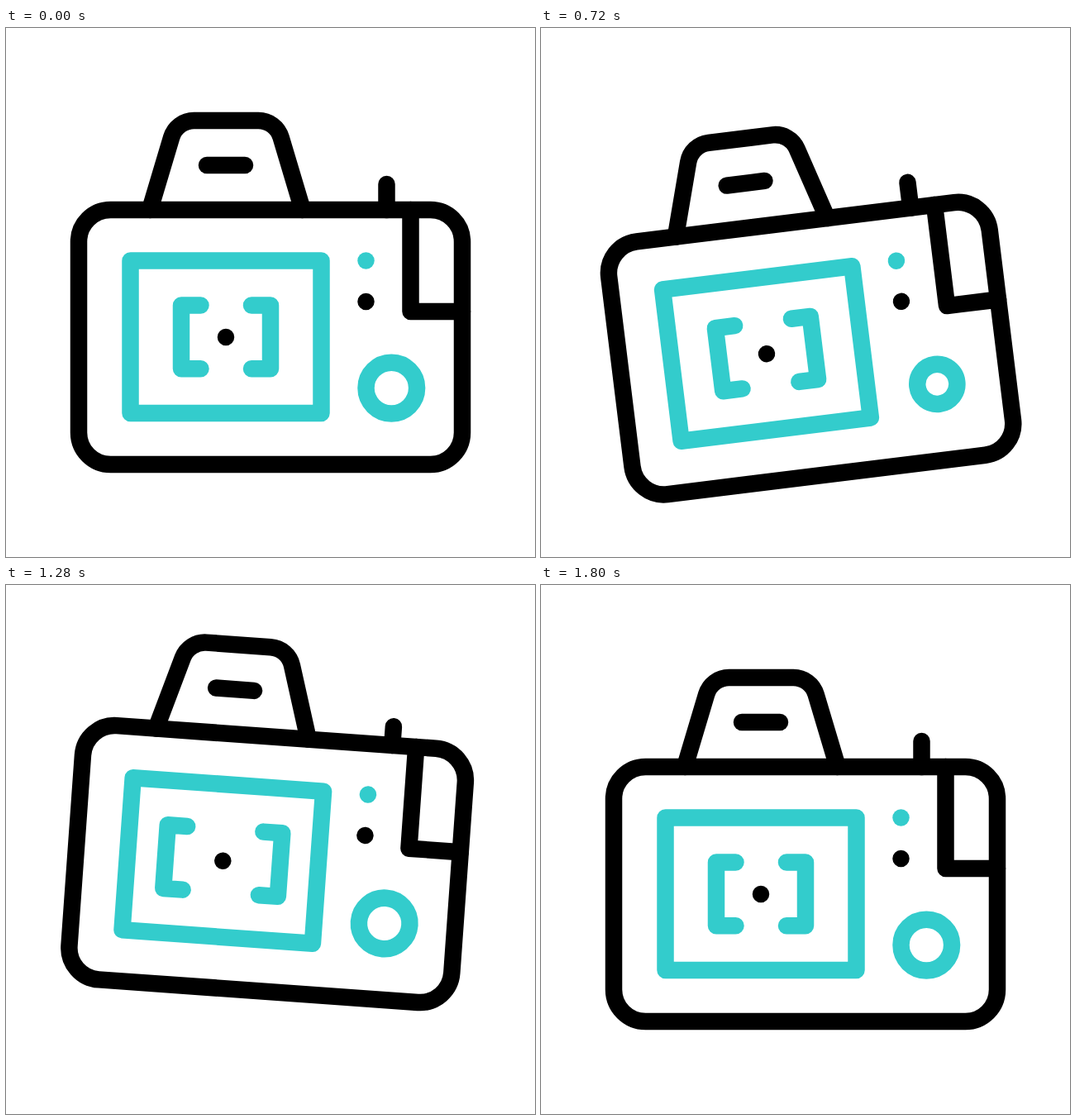
These frames come from a looping animation (640x640 px, 1920 ms). An HTML page:

```html
<!DOCTYPE html>
<html lang="en">
<head>
<meta charset="utf-8">
<title>Camera</title>
<style>
  html, body { margin: 0; width: 100%; height: 100%; overflow: hidden; background: #fff; }
  svg { display: block; width: 100%; height: 100%; }
  .line { fill: none; stroke: #000; stroke-width: 20.5; stroke-linecap: round; stroke-linejoin: round; }
  .teal { stroke: #3cc; }
</style>
</head>
<body>
<svg viewBox="0 0 640 640">
  <g id="camera" class="line">
    <path d="M174 220 200.2 132.3A28.5 28.5 0 0 1 227.5 112H305.3A28.5 28.5 0 0 1 332.6 132.3L358.8 220"/>
    <path d="M243 166H289"/>
    <path id="shutter"/>
    <rect x="88" y="220" width="464" height="308" rx="38.5"/>
    <path d="M489.5 220V343H552"/>
    <g class="teal">
      <rect x="150.5" y="281.5" width="231" height="184.6"/>
      <path id="left" d="M235.5 335.5H212V412.3H235.5"/>
      <path id="right" d="M297 335.5H320V412.3H297"/>
      <circle id="dial" cx="466.3" cy="435.6"/>
      <path d="M435.5 281.5h0"/>
    </g>
    <path d="M435.5 331h0M266 374h0"/>
  </g>
</svg>
<script>
  const LOOP = 1920, STEP = 40;
  const part = id => document.getElementById(id);
  const set = (id, name, value) => part(id).setAttribute(name, value);

  // Eased value through [time, value] keys, held before the first and after the last.
  function track(t, ...keys) {
    let [t0, v0] = keys[0];
    for (const [t1, v1] of keys) {
      if (t < t1) {
        const u = Math.max(0, (t - t0) / (t1 - t0 || 1));
        return v0 + (v1 - v0) * u * u * (3 - 2 * u);
      }
      [t0, v0] = [t1, v1];
    }
    return v0;
  }

  function draw() {
    const t = Math.floor((performance.now() % LOOP) / STEP) * STEP;
    const lift = track(t, [110, 0], [690, 14], [745, 14], [1160, -40], [1800, 0]);
    const tilt = track(t, [145, 0], [780, -7.2], [1175, 4.1], [1265, 4.1], [1800, 0]);
    const spread = track(t, [640, 0], [1008, 32], [1540, 0]);
    const shrink = track(t, [400, 0], [805, 7.6], [1147, 0]);
    const press = track(t, [880, 0], [1240, 8.5], [1580, 0]);

    set('camera', 'transform', `translate(0 ${lift}) rotate(${tilt} 320 320)`);
    set('left', 'transform', `translate(${-spread})`);
    set('right', 'transform', `translate(${spread})`);
    set('dial', 'r', 30.8 - shrink);
    set('shutter', 'd', `M460.5 ${189 + press}V220`);
    requestAnimationFrame(draw);
  }
  draw();
</script>
</body>
</html>
```
